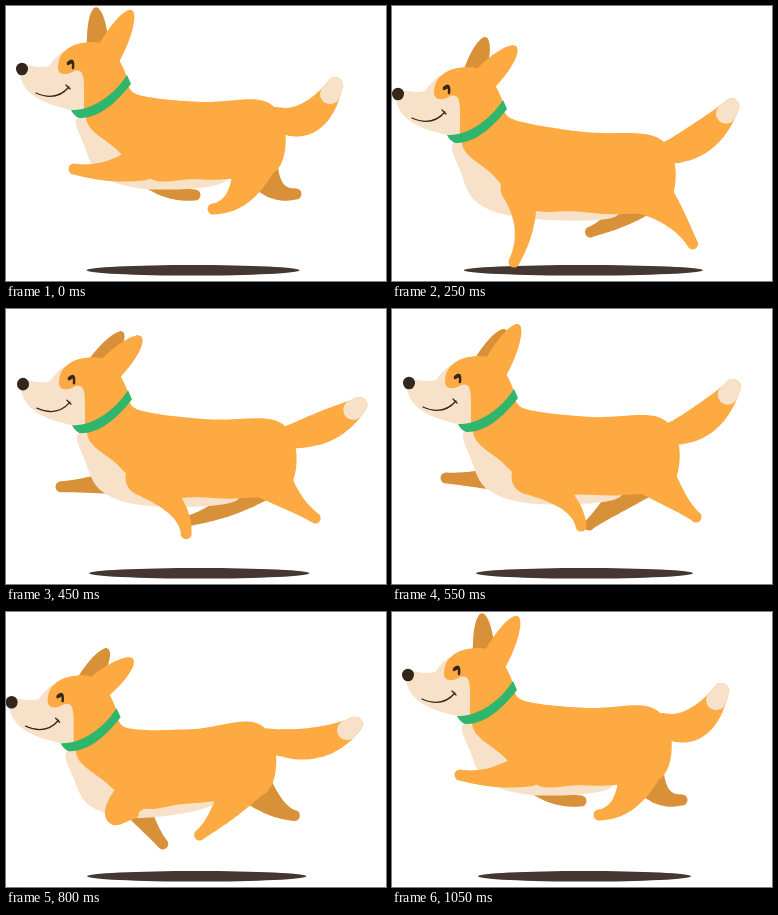
These frames come from a looping animation (380x275 px, 1.1 s). An HTML page with a canvas:

```html
<!DOCTYPE html>
<html>
<head>
<meta charset="utf-8">
<title>Running dog</title>
<style>
html, body { margin: 0; width: 380px; height: 275px; overflow: hidden; background: #fff; }
canvas { display: block; }
</style>
</head>
<body>
<canvas id="stage" width="380" height="275"></canvas>
<script>
const ctx = document.getElementById('stage').getContext('2d');
const LOOP = 1100, STEP = 50;
const ORANGE = '#fcaa41', SHADE = '#d99139', CREAM = '#f8e1c9',
      GREEN = '#2fb56c', INK = '#33261a', SHADOW = '#443630';

// Key times (ms) of the few joints that drive the dog.
const joints = {
  nose: { 0: [16, 63], 150: [17, 68], 250: [6, 88], 350: [17, 78], 550: [17, 74], 700: [5.5, 95], 900: [6, 81] },
  rump: { 0: [258, 95], 150: [254, 139], 350: [270, 118], 550: [266, 108], 700: [250, 116], 900: [248, 102] },
  // tip x, y and sag
  tail: { 0: [329, 79, 32], 150: [313, 84, 26], 350: [366, 114, 5], 550: [341, 78, 16], 700: [350, 115, 24], 900: [346, 107, 20] },
  // near and far ear: 0 upright, 1 laid back
  ears: { 0: [0, 0], 150: [0, 0], 350: [1, 1], 550: [0, 0.8], 700: [0.25, 0.6], 900: [1, 1] },
  // legs: bend, then paw
  nearFront: {
    0: [100, 170, 68, 163], 150: [130, 213, 88, 224], 250: [140, 220, 122, 256], 350: [168, 210, 161, 239],
    550: [185, 190, 189, 217], 700: [140, 235, 189, 236], 900: [62, 186, 66, 165]
  },
  farFront: {
    0: [160, 190, 189, 189], 150: [165, 213, 193, 213], 350: [95, 184, 58, 192],
    550: [95, 172, 54, 169], 700: [122, 215, 109, 254], 900: [150, 200, 187, 203]
  },
  nearHind: {
    0: [238, 200, 207, 203], 150: [288, 225, 278, 262], 350: [280, 190, 311, 212],
    550: [282, 190, 304, 208], 700: [228, 215, 221, 246], 900: [212, 195, 181, 200]
  },
  farHind: {
    0: [262, 192, 290, 188], 150: [228, 220, 235, 243], 350: [230, 207, 178, 209],
    550: [216, 200, 197, 216], 700: [262, 210, 279, 223], 900: [270, 190, 292, 184]
  },
  shadow: { 0: [187], 150: [188.5], 350: [193.5], 550: [192.5], 700: [189], 900: [192.5], 1050: [192.5] }
};
// The loop closes by holding the opening pose.
for (const keys of Object.values(joints)) keys[1050] ??= keys[0];

const muzzle = new Path2D('M0-4C8-4 18 0 27-3C32-10 38-17 45-19L62 0L64 40L49 41C32 37 2 30-2 6Z');
const face = new Path2D('M43-18C50-25 60-27 72-27C86-27 98-12 105 8C95 25 75 41 62 41L62 20' +
  'C62 4 60 0 52 2C44 7 37 6 36 0C36-10 39-15 43-18Z');
const collar = new Path2D('M49 41C70 42 92 26 105 6L109 15C96 32 77 50 57 49Q52 47 49 41Z');
const smile = new Path2D('M14 24Q34 33 47 18M44 16Q46 18 48 20');
const eye = new Path2D('M46-6Q52-12 51-1M46-5L50-7');

const mix = (a, b, u) => a + (b - a) * u;
const mid = (a, b) => [mix(a[0], b[0], 0.5), mix(a[1], b[1], 0.5)];
const shift = ([x, y], dx, dy) => [x + dx, y + dy];

// Cyclic monotone cubic through the keys.
function pose(keys, t) {
  const times = Object.keys(keys).map(Number), n = times.length;
  const wrap = k => times[(k + n) % n];
  const when = k => wrap(k) + LOOP * Math.floor(k / n);
  const i = times.filter(x => x <= t).length - 1;
  const span = when(i + 1) - when(i), u = (t - when(i)) / span;
  return keys[times[i]].map((_, c) => {
    const value = k => keys[wrap(k)][c];
    const slope = k => (value(k + 1) - value(k)) / (when(k + 1) - when(k));
    const tangent = k => {
      const a = slope(k - 1), b = slope(k);
      return a * b > 0 ? 2 * a * b / (a + b) : 0;
    };
    return mix(value(i), value(i + 1), u * u * (3 - 2 * u)) +
      span * u * (1 - u) * (tangent(i) * (1 - u) - tangent(i + 1) * u);
  });
}

function fill(color, path) {
  ctx.fillStyle = color;
  path ? ctx.fill(path) : ctx.fill();
}

function line(path, width) {
  ctx.strokeStyle = INK;
  ctx.lineWidth = width;
  ctx.stroke(path);
}

function oval(x, y, rx, ry, color) {
  ctx.beginPath();
  ctx.ellipse(x, y, rx, ry, 0, 0, 7);
  fill(color);
}

// Smooth closed curve through the points.
function blob(points, color) {
  const n = points.length, at = k => points[(k + n) % n];
  ctx.beginPath();
  ctx.moveTo(...points[0]);
  for (let k = 0; k < n; k++) {
    const [a, b, c, d] = [at(k - 1), at(k), at(k + 1), at(k + 2)];
    ctx.bezierCurveTo(b[0] + (c[0] - a[0]) / 6, b[1] + (c[1] - a[1]) / 6,
      c[0] - (d[0] - b[0]) / 6, c[1] - (d[1] - b[1]) / 6, ...c);
  }
  fill(color);
}

// Tapered stroke along a quadratic curve.
function limb(start, bend, end, radius, color, from = 0) {
  ctx.beginPath();
  for (let k = from * 80; k <= 80; k++) {
    const u = k / 80;
    const [x, y] = [0, 1].map(c => mix(mix(start[c], bend[c], u), mix(bend[c], end[c], u), u));
    const r = radius(u);
    ctx.moveTo(x + r, y);
    ctx.arc(x, y, r, 0, 7);
  }
  fill(color);
}

function leg(hip, [bx, by, px, py], girth, color) {
  limb(hip, [bx, by], [px, py], u => 5.5 + girth * (1 - u) ** 1.5, color);
}

function ear(base, tip, width, color) {
  limb(base, mid(base, tip), tip, u => width * Math.sqrt(1 - u * u), color);
}

function drawTail(rump, [x, y, sag]) {
  const base = shift(rump, 12, 17), tip = [x, y];
  const bend = shift(mid(base, tip), 6, sag);
  const radius = u => 11 + 6 * Math.sin(Math.PI * u) - 3 * u;
  limb(base, bend, tip, radius, ORANGE);
  limb(base, bend, tip, radius, CREAM, 0.9);
}

function drawHead(nose, [near, far]) {
  ctx.save();
  ctx.translate(...nose);
  ear([76, -20], [mix(74, 101, far), mix(-60, -50, far)], 11, SHADE);
  fill(CREAM, muzzle);
  fill(ORANGE, face);
  ear([86, -14], [mix(109, 125, near), mix(-57, -35, near)], 13, ORANGE);
  fill(GREEN, collar);
  oval(0, 0, 6, 6.3, INK);
  line(smile, 1.3);
  line(eye, 2.5);
  ctx.restore();
}

function draw(t) {
  const now = {};
  for (const name in joints) now[name] = pose(joints[name], t);
  const { nose, rump } = now;
  const fromNose = (dx, dy) => shift(nose, dx, dy);
  const fromRump = (dx, dy) => shift(rump, dx, dy);
  const tilt = 0.4 * (rump[1] - nose[1] - 36);
  const shoulder = fromNose(120, 94), hip = fromRump(-8, 55);
  const back = fromNose(117, 26), loin = fromRump(-35, 78), elbow = fromNose(130, 112 + tilt);

  ctx.clearRect(0, 0, 380, 275);
  // The shadow widens as the hips come down.
  oval(now.shadow[0], 264.3, 106.5 + Math.max(0, rump[1] - 104) / 2, 5.3, SHADOW);
  leg(shoulder, now.farFront, 12, SHADE);
  leg(hip, now.farHind, 16, SHADE);

  blob([fromNose(57, 48), fromNose(62, 76), fromNose(80, 108 + tilt / 2), fromNose(130, 122 + tilt),
    fromRump(-38, 80), fromRump(-50, 40), fromNose(110, 60)], CREAM);
  drawTail(rump, now.tail);
  blob([fromNose(92, -5), fromNose(104, 10), back, shift(mid(back, rump), 0, 4), rump,
    fromRump(21, 29), fromRump(12, 70), loin, mid(loin, elbow), elbow,
    fromNose(94, 80), fromNose(64, 48)], ORANGE);

  leg(hip, now.nearHind, 18, ORANGE);
  leg(shoulder, now.nearFront, 12, ORANGE);
  drawHead(nose, now.ears);
}

function tick() {
  draw(Math.floor(performance.now() % LOOP / STEP) * STEP);
  requestAnimationFrame(tick);
}
ctx.lineCap = 'round';
tick();
</script>
</body>
</html>
```
